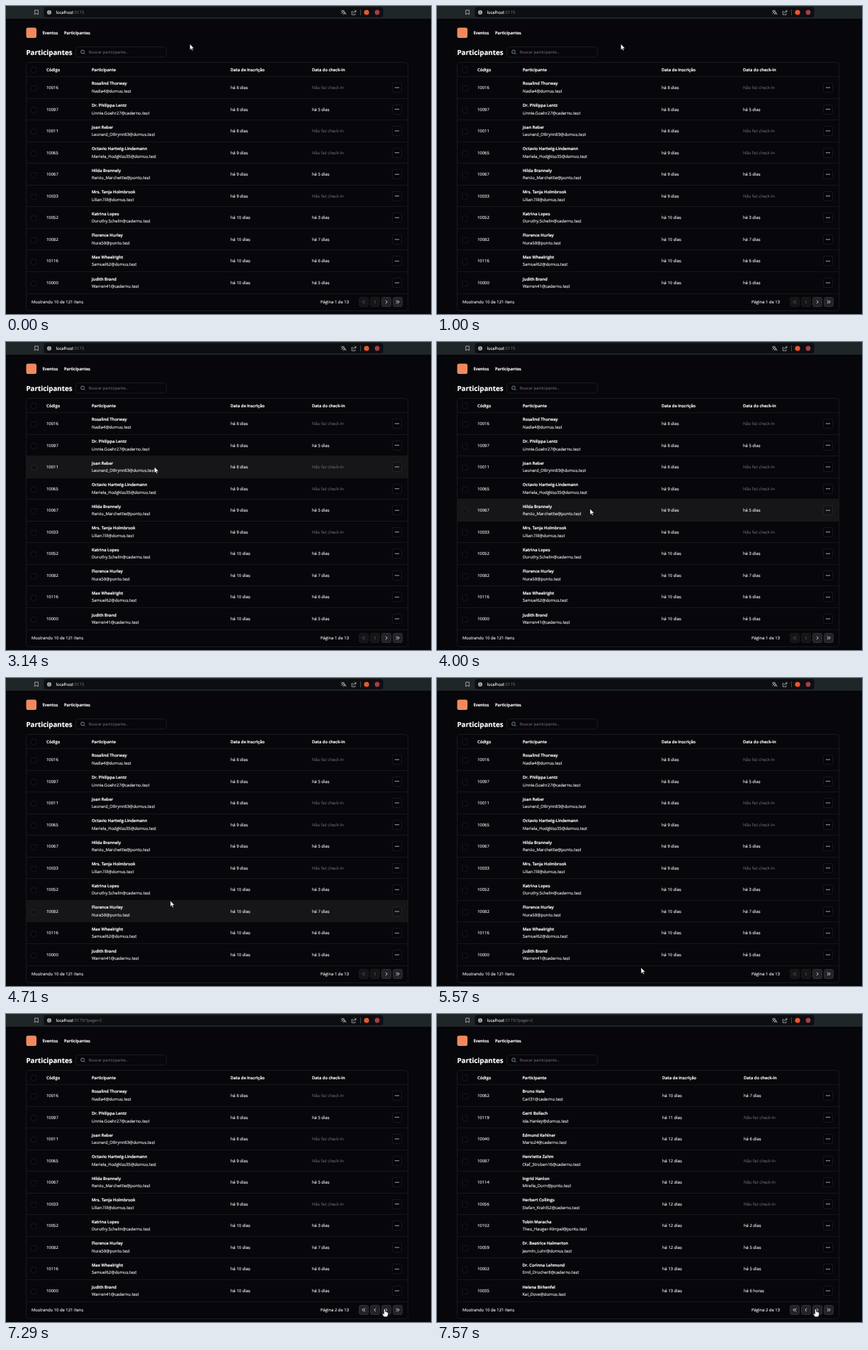
Recreate the animation shown at these times as an HTML page. Size 600 px wide and 434 px high, loop 8000 ms.

```html
<!DOCTYPE html>
<html lang="pt-BR">
<head>
<meta charset="utf-8">
<title>Participantes</title>
<style>
html, body { margin: 0; width: 100%; height: 100%; overflow: hidden; background: #07060a; }
svg { display: block; width: 600px; height: 434px; font: 5.9px "Open Sans", "Noto Sans", sans-serif; }
text { fill: #eeeef1; stroke: #eeeef1; stroke-width: .13; white-space: pre; text-rendering: geometricPrecision; }
.b { font-weight: 600; font-size: 5.8px; fill: #fff; stroke: #fff; stroke-width: .2; }
.h { font-weight: 700; font-size: 9.8px; fill: #fff; stroke: #fff; stroke-width: .2; }
.dim { fill: #5f5f66; stroke: #5f5f66; }
.hint { font-size: 5.75px; fill: #7b7f85; stroke: none; }
.line { fill: none; stroke: #17161a; }
.icon { fill: none; stroke: #b9bcbf; stroke-width: .8; }
</style>
</head>
<body>
<svg id="stage" viewBox="0 0 600 434"></svg>
<script>
const LOOP = 8000, FPS = 7, TOP = 99.5, ROW = 30.56;
const PAGE_AT = 7290, ROWS_AT = 7430, HAND_AT = 6425;

// code | name | mailbox | signed up | checked in
const MAIL = { d: 'domus.test', c: 'caderno.test', p: 'ponto.test' };
const pages = [`
10016|Rosalind Thorway|Nadia4@d|8 dias|
10097|Dr. Philippa Lentz|Linnie.Goehr27@c|8 dias|5 dias
10011|Joan Reber|Leonard_OBrynn83@d|8 dias|
10065|Octavio Hartwig-Lindemann|Mariela_Hodgkiss35@d|9 dias|
10067|Hilda Brannely|Renzo_Marchettie@p|9 dias|5 dias
10033|Mrs. Tanja Holmbrook|Lilian.Till@d|9 dias|
10052|Katrina Lopes|Dorothy.Schelin@c|10 dias|3 dias
10082|Florence Hurley|Nora58@p|10 dias|7 dias
10116|Max Wheelright|Samuel62@d|10 dias|6 dias
10000|Judith Brand|Warren41@c|10 dias|5 dias`, `
10062|Bruno Hale|Carl31@c|10 dias|7 dias
10119|Gerti Bollach|Ida.Hanley@d|11 dias|
10040|Edmund Kehlner|Mario24@c|12 dias|6 dias
10087|Henriette Zahm|Olaf_Stroben16@c|12 dias|
10114|Ingrid Hanlon|Mirelle_Dorn@p|12 dias|
10056|Herbert Collings|Stefan_Krahl52@c|12 dias|
10102|Tobin Maracha|Theo_Hauger-Kimpel@p|12 dias|2 dias
10059|Dr. Beatrice Halmerton|Jasmin_Lohr@d|12 dias|5 dias
10002|Dr. Corinna Lehmond|Emil_Drucher8@c|13 dias|5 dias
10035|Helena Birkenfel|Kai_Dove@d|13 dias|6 horas`
].map(p => p.trim().split('\n').map(r => r.split('|')));

// pointer path: step, x, y
const path = [
  [11, 259.5, 53.5], [12, 232, 84], [13, 204.5, 111], [15, 201.5, 113], [18, 201.5, 113],
  [22, 209.5, 176], [26, 211, 208], [27, 211, 208], [28, 216, 235], [35, 244, 373],
  [36, 252, 380], [39, 288, 408], [43, 515.5, 416.5], [45, 534.5, 415.5]
];

const text = (x, y, s, cls = '') => `<text x="${x}" y="${y}" class="${cls}">${s}</text>`;
const box = (x, y, w, h, r, fill, stroke = 'none') =>
  `<rect x="${x}" y="${y}" width="${w}" height="${h}" rx="${r}" fill="${fill}" stroke="${stroke}"/>`;
const shape = (d, attrs) => `<path d="${d}" ${attrs}/>`;
const check = y => box(36, y - 3.5, 7, 7, 1.5, '#0003', '#ffffff12');

function browserBar() {
  return box(0, 0, 600, 18, 0, '#202527') + box(53.5, 1.5, 479, 14.5, 3.5, '#0c0f11') +
    shape('M40.7 5.8H45.3V12L43 10.3L40.7 12Z', 'class="icon"') +
    '<circle cx="61" cy="9" r="3" fill="#aeb1b4"/>' +
    shape('M61 8.5V10.8M61 7V7.8', 'stroke="#0c0f11" stroke-width=".8"') +
    shape('M473 6.8H478M475.5 5.7V6.8M477 6.8Q476 9.5 473.2 10.6M474 7.5Q475 9.4 476.5 10M476.3 12.2L478.2 8L480 12.2M477 10.9H479.4', 'class="icon"') +
    shape('M489.5 7.5H488.2V12.2H493V10.5M490 10Q490.2 7.5 494.3 7.3M492.5 5.5L494.4 7.3L492.5 9', 'class="icon"') +
    shape('M500.5 5V13', 'stroke="#55595c" stroke-width=".8"') +
    '<circle cx="509" cy="9" r="3.6" fill="#f0562b"/><circle cx="524" cy="9" r="3.4" fill="#a93a4e"/>' +
    '<text x="70.5" y="11.1">localhost<tspan id="url" fill="#80858a" stroke="none"></tspan></text>';
}

function header() {
  return box(28.5, 30.5, 14.5, 14.5, 2.5, '#f08a5d') +
    text(51.4, 40, 'Eventos', 'b') + text(82, 40, 'Participantes', 'b') +
    text(28.4, 69.3, 'Participantes', 'h') +
    box(98.5, 57.5, 128, 14.5, 4, 'none', '#1a191d') +
    shape('M110 66.6L111.6 68.2M110.5 64.5A2.4 2.4 0 1 1 105.7 64.5A2.4 2.4 0 1 1 110.5 64.5', 'fill="none" stroke="#86aea3" stroke-width=".8"') +
    text(117, 67, 'Buscar participante...', 'hint');
}

function tableFrame() {
  let s = box(28.5, 79.5, 539, 350, 4, 'none', '#19181c') + check(90);
  for (let i = 0; i <= 10; i++) {
    const y = Math.round(TOP + ROW * i - .5) + .5;
    s += shape(`M29 ${y}H567`, 'class="line"');
    if (i == 10) break;
    const mid = TOP + ROW * (i + .5) + .2;
    s += check(mid + 1) + box(545.5, Math.round(mid) - 6.5, 13, 13, 2.5, '#0003', '#ffffff12');
    for (const x of [549.9, 552, 554.1]) s += `<circle cx="${x}" cy="${mid}" r=".75" fill="#d8d8dc"/>`;
  }
  return s + text(36, 419.3, 'Mostrando 10 de 121 itens');
}

function rows(p) {
  const dx = p, mailX = 121 - p * .5;
  let s = text(57, 92, 'Código', 'b') + text(mailX, 92, 'Participante', 'b') +
    text(317 + dx, 92, 'Data de inscrição', 'b') + text(432 + dx, 92, 'Data do check-in', 'b');
  pages[p].forEach(([code, name, mail, since, seen], i) => {
    const y = TOP + ROW * (i + .5) + 2.2;
    const address = mail.replace(/@(.)$/, (_, k) => '@' + MAIL[k]);
    s += text(57, y, code) + text(mailX, y - 5.5, name, 'b') + text(mailX, y + 5, address) +
      text(317 + dx, y, 'há ' + since) +
      (seen ? text(432 + dx, y, 'há ' + seen) : text(432 + dx, y, 'Não fez check-in', 'dim'));
  });
  return s;
}

function pager(p) {
  const left = x => `M${x + 1} 414.8L${x - 1.2} 417L${x + 1} 419.2`;
  const right = x => `M${x - 1} 414.8L${x + 1.2} 417L${x - 1} 419.2`;
  const icons = [left(503.9) + left(506.3), left(521), right(537), right(551.7) + right(554.1)];
  return text(444, 419.3, `Página ${p + 1} de 13`) + icons.map((d, i) => {
    const on = p || i > 1;
    return box(498.5 + 16 * i, 410.5, 13, 13, 2.5, on ? '#232226' : '#151417', on ? '#2f2e32' : '#1a191d') +
      shape(d, `fill="none" stroke-width=".9" stroke="${on ? '#e4e4e7' : '#55545a'}"`);
  }).join('');
}

const outline = 'fill="#fff" stroke="#111" stroke-width=".6" stroke-linejoin="round"';
const arrow = shape('M0 0V8.4L1.9 6.7L3.2 9.6L4.6 9L3.3 6.2H6Z', outline);
const hand = shape('M-1 1Q0 -.4 1 1V4.2Q2 3.6 2.5 4.5Q3.4 4 3.9 4.9Q4.9 4.7 4.9 6V8.3L3.8 11.2H-1L-3.3 7.6Q-3.6 6.2 -2.2 6.4L-1 7.6Z', outline);

const $ = id => document.getElementById(id);
$('stage').innerHTML = `<rect id="hover" x="29" width="538" height="${ROW}" fill="#161517"/>` +
  browserBar() + header() + tableFrame() +
  '<g id="rows"></g><g id="pager"></g><g id="pointer"></g>';

const cache = {};
function set(id, key, make) {
  if (cache[id] === key) return;
  cache[id] = key;
  $(id).innerHTML = make(key);
}

function pointerAt(step) {
  const j = path.findIndex(p => p[0] >= step);
  if (j < 0) return path[path.length - 1].slice(1);
  if (!j) return path[0].slice(1);
  const [a, ax, ay] = path[j - 1], [b, bx, by] = path[j];
  const f = (step - a) / (b - a);
  return [ax + (bx - ax) * f, ay + (by - ay) * f];
}

function draw(now) {
  const t = now % LOOP;
  const step = Math.floor((t + 3) * FPS / 1000);
  const [x, y] = pointerAt(step);
  const row = Math.floor((y - TOP) / ROW);
  const page = +(t >= PAGE_AT);
  $('hover').setAttribute('y', TOP + ROW * row);
  $('hover').style.display = row >= 0 && row < 10 ? '' : 'none';
  set('rows', +(t >= ROWS_AT), rows);
  set('pager', page, pager);
  set('url', page, p => p ? ':5173/?page=2' : ':5173');
  set('pointer', t >= HAND_AT, on => on ? hand : arrow);
  $('pointer').setAttribute('transform', `translate(${x} ${y})`);
}

const start = performance.now();
function tick() {
  draw(performance.now() - start);
  requestAnimationFrame(tick);
}
tick();
</script>
</body>
</html>
```
